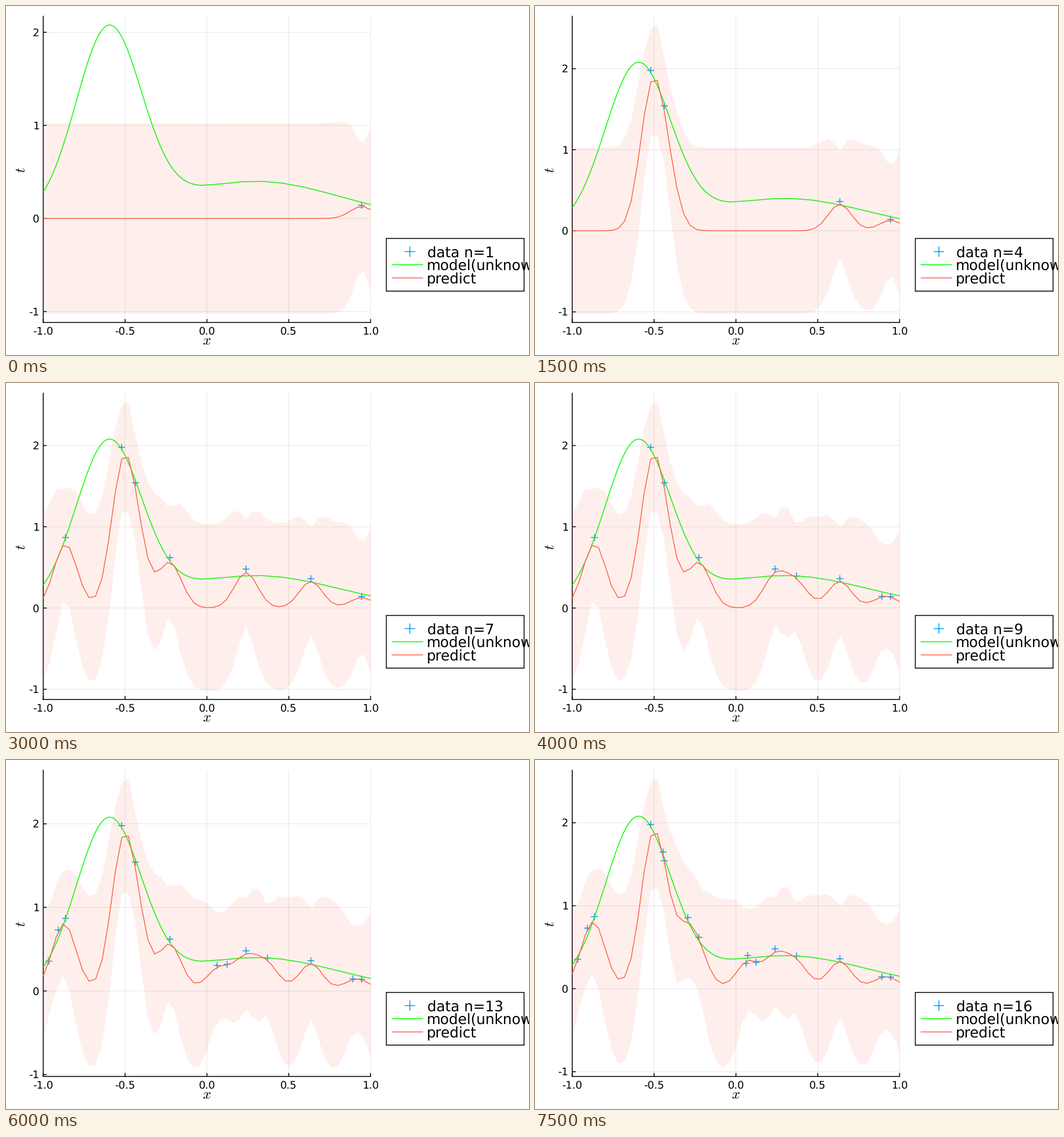
A matplotlib script for the animation above (8000 ms loop, 900 px wide and 600 px high).

```python
import numpy as np
import matplotlib.pyplot as plt
from matplotlib.animation import FuncAnimation

W, H, DPI = 900, 600, 100
LEFT, RIGHT, TOP, BOTTOM = 64.1, 627.4, 17.6, 544.1
NOISE, GAMMA, PAD = 0.1, 100, 0.03
BLUE, LIME, TOMATO = "#009afa", "#00ff00", "#ff6347"
PT = 72 / DPI  # points per pixel
LW = 1.5 * PT

plt.rcParams.update({
    "font.family": "DejaVu Sans",
    "mathtext.fontset": "cm",
    "text.hinting": "none",
    "path.snap": False,
    "path.simplify": False,
})

# observations in order of arrival
DATA = np.array([
    (0.945, 0.141), (0.635, 0.361), (-0.437, 1.542), (-0.521, 1.978),
    (-0.864, 0.868), (-0.226, 0.620), (0.239, 0.480), (0.370, 0.394),
    (0.892, 0.144), (0.1235, 0.318), (0.062, 0.305), (-0.966, 0.356),
    (-0.908, 0.730), (-0.445, 1.648), (0.072, 0.401), (-0.294, 0.856),
])
GRID = np.linspace(-1, 1, 51)


def model(x):
    return 2 * np.exp(-(x + 0.6) ** 2 / 0.08) + 0.4 * np.exp(-(x - 0.3) ** 2 / 0.5)


def kernel(a, b):
    return np.exp(-GAMMA * (a[:, None] - b[None, :]) ** 2)


def predict(n):
    """Posterior mean and band half-width on GRID after n observations."""
    x, t = DATA[:n].T
    cov = kernel(x, x) + NOISE * np.eye(n)
    k = kernel(x, GRID)
    weights = np.linalg.solve(cov, k)
    var = 1 + NOISE - np.sum(k * weights, axis=0)
    return t @ weights, var ** 0.25


def px(x):
    return LEFT + (np.asarray(x) + 1) / 2 * (RIGHT - LEFT)


def pluses(xs, ys, r):
    """Plus signs as one polyline with gaps."""
    xs, ys = np.atleast_1d(xs), np.atleast_1d(ys)
    dx = np.array([-r, r, np.nan, 0, 0, np.nan])
    dy = np.array([0, 0, np.nan, -r, r, np.nan])
    return (xs[:, None] + dx).ravel(), (ys[:, None] + dy).ravel()


fig = plt.figure(figsize=(W / DPI, H / DPI), dpi=DPI, facecolor="white")
ax = fig.add_axes([0, 0, 1, 1])
ax.set(xlim=(0, W), ylim=(H, 0))
ax.axis("off")


def line(x, y, color, z, lw=LW, **kw):
    kw.setdefault("solid_capstyle", "butt")
    return ax.plot(x, y, color=color, lw=lw, zorder=z, **kw)[0]


def label(x, y, s, size, ha="center", **kw):
    return ax.text(x, y, s, fontsize=size * PT, ha=ha, va="baseline", zorder=9, **kw)


# axes
GRID_STYLE = dict(color="black", z=1, lw=1 * PT, alpha=0.1)
line([LEFT, LEFT], [TOP, BOTTOM], "black", 2, solid_capstyle="projecting")
line([LEFT, RIGHT], [BOTTOM, BOTTOM], "black", 2, solid_capstyle="projecting")
for v in (-1, -0.5, 0, 0.5, 1):
    x = px(v)
    line([x, x], [TOP, BOTTOM], **GRID_STYLE)
    line([x, x], [BOTTOM, BOTTOM - 6], "black", 2)
    label(x, 564.3, f"{v:.1f}", 18)
y_ticks = []
for v in (-1, 0, 1, 2):
    y_ticks.append((v,
                    line([], [], **GRID_STYLE),
                    line([], [], "black", 2),
                    label(57.3, 0, str(v), 18, ha="right")))
label(345.3, 582.8, "$x$", 24.6)
label(33, 281.7, "$t$", 24.6, rotation=90, rotation_mode="anchor")

# series
model_x = np.r_[np.linspace(-1, -0.03, 75), np.arange(0.1, 1, 0.12), 1]
data_line = line([], [], BLUE, 3)
model_line = line([], [], LIME, 4)
band = ax.fill([0, 0, 0], [0, 0, 0], color=TOMATO, alpha=0.1, lw=0, zorder=5)[0]
mean_line = line([], [], TOMATO, 6)

# legend
ax.add_patch(plt.Rectangle((654.5, 399.6), 237, 90.6, fc="white", ec="black",
                           lw=LW, zorder=7))
line(*pluses(695, 422.3, 9), BLUE, 8)
line([663.7, 717.7], [444.8, 444.8], LIME, 8)
line([663.7, 717.7], [467.5, 467.5], TOMATO, 8)
count_text = label(724.6, 431.2, "", 24.6, ha="left")
label(723.6, 453.8, "model(unknown)", 24.6, ha="left")
label(723.6, 476.4, "predict", 24.6, ha="left")


def update(i):
    n = i + 1
    mean, half = predict(n)
    lo, hi = mean - half, mean + half
    curve = model(model_x)
    ymin, ymax = lo.min(), max(hi.max(), curve.max())
    margin = PAD * (ymax - ymin)
    ymin, ymax = ymin - margin, ymax + margin

    def py(y):
        return BOTTOM - (y - ymin) / (ymax - ymin) * (BOTTOM - TOP)

    for v, grid, tick, text in y_ticks:
        y = py(v)
        grid.set_data([LEFT, RIGHT], [y, y])
        tick.set_data([LEFT, LEFT + 6], [y, y])
        text.set_y(y + 6.5)

    data_line.set_data(*pluses(px(DATA[:n, 0]), py(DATA[:n, 1]), 6))
    model_line.set_data(px(model_x), py(curve))
    mean_line.set_data(px(GRID), py(mean))
    outline_x = px(np.r_[GRID, GRID[::-1]])
    band.set_xy(np.c_[outline_x, py(np.r_[hi, lo[::-1]])])
    count_text.set_text(f"data n={n}")
    return []


anim = FuncAnimation(fig, update, frames=len(DATA), interval=500,
                     repeat=True, repeat_delay=0, blit=False)
plt.show()
```
